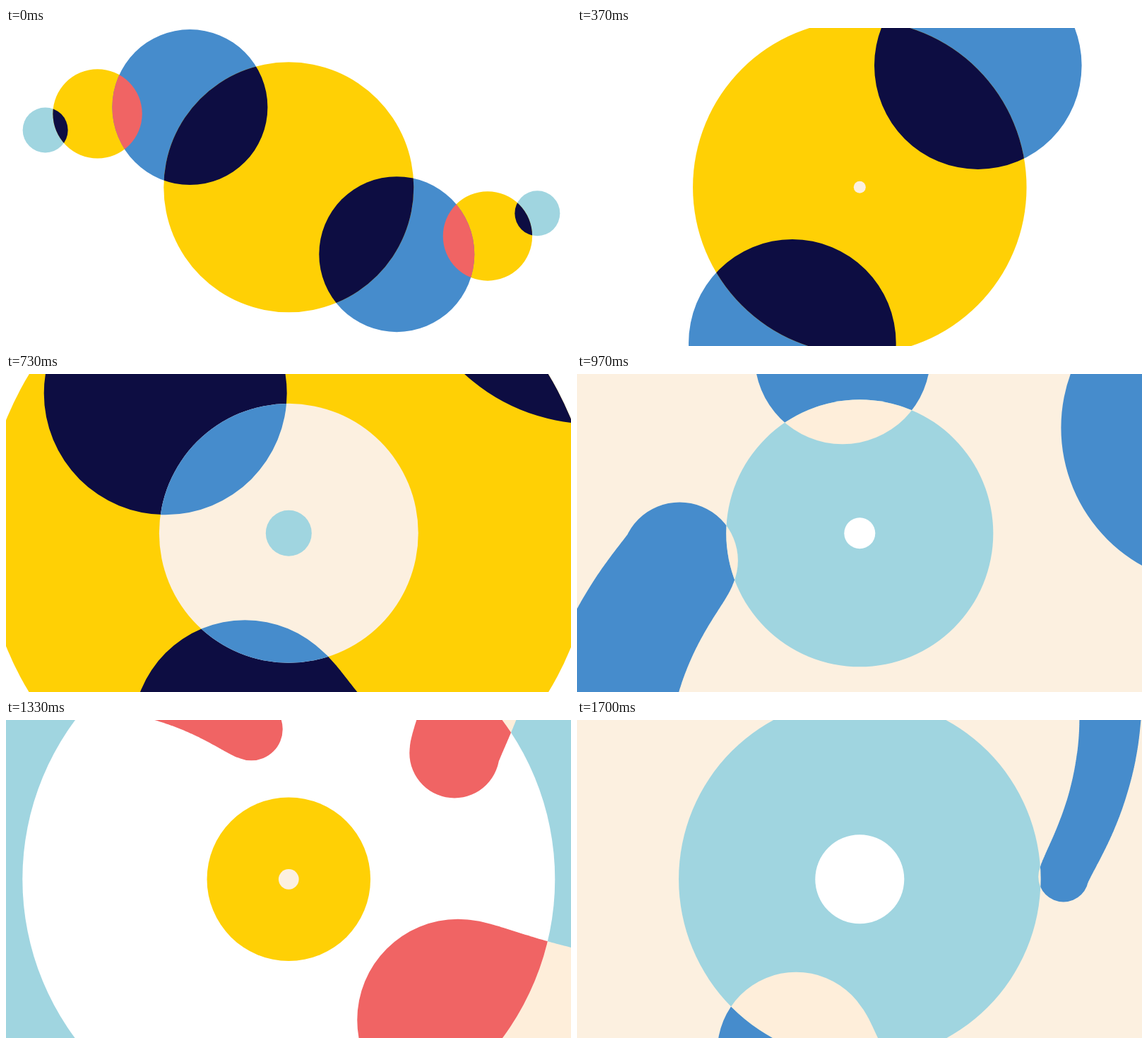
These frames come from a looping animation (800x450 px, 1.73 s). An HTML page with a canvas:

```html
<!DOCTYPE html>
<html lang="en">
<head>
<meta charset="utf-8">
<title>Orbiting discs</title>
<style>
html, body { margin: 0; width: 100%; height: 100%; overflow: hidden; background: #fff; }
canvas { display: block; width: 800px; height: 450px; }
</style>
</head>
<body>
<canvas id="stage" width="800" height="450"></canvas>
<script>
const ctx = document.getElementById('stage').getContext('2d');
const LOOP = 1730, STEP = 100 / 3, CX = 400.3, CY = 225.3, RAD = Math.PI / 180;
const WHITE = '#ffffff', YELLOW = '#ffd005', CREAM = '#fcf0e0', PEACH = '#feeeda',
      AQUA = '#a0d5e0', BLUE = '#468ccc', NAVY = '#0d0d42', RED = '#f06464';

// Disc colours in turn, each with the colour an orbiter takes on over it.
const CYCLE = [[CREAM, BLUE], [AQUA, PEACH], [WHITE, RED], [YELLOW, NAVY]];

// Discs opening from the centre: start step, and growth of the radius' cube root.
const DISCS = [[4.834, 0.331], [13.233, 0.364], [22.03, 0.402], [28.949, 0.441],
               [35.138, 0.5], [39.238, 0.54], [43.631, 0.54]];

const decay = (m, floor, span, k, p) => floor + span * Math.exp(-((Math.max(m, 0) / k) ** p));
const cubic = (m, a, b, c, d) => a + m * (b + m * (c + m * d));
const mix = (a, b, t) => a + (b - a) * t;
const zoom = n => 1 + 1.435 * (n / 22) ** 2.1;

function smooth(t) {
  t = Math.min(1, Math.max(0, t));
  return t * t * (3 - 2 * t);
}

// Spirals by m, the steps since SPIRAL; the first two set out from the opening chain.
const SPIRAL = 22;
const ORBITERS = [
  { from: 219, sweep: 95.2, tail: 16,
    angle: m => cubic(m, 462.4, 11.55, -0.29, 0.0068),
    dist: m => cubic(m, 288.7, -3, -0.2975, 0.01382),
    size: m => decay(m, 33, 126, 7.5, 1),
    turn: m => 22 + 0.12 * m,
    reach: m => 150 - 50 * (m / 29) ** 6 },
  { from: 31.8, sweep: 81.6, tail: 29,
    angle: m => cubic(m, 228.6, 5.1, 0, 0.0004),
    dist: m => cubic(m, 264, -2.33, -0.0147, 0.01332),
    size: m => decay(m, 46, 126, 11.5, 1.5),
    turn: m => 32 - 1.05 * m,
    reach: m => 150 },
  { tail: 36,
    angle: m => cubic(m, -44.5, 3.6, 0.06, 0),
    dist: m => decay(m, 257, 346, 13.57, 2.17),
    size: m => decay(m, 104, 164, 14.3, 1.6),
    turn: m => 1.2 * m - 14,
    reach: m => 155 }
];

function polar(angle, dist) {
  return [CX + dist * Math.cos(angle * RAD), CY + dist * Math.sin(angle * RAD)];
}

function circle(x, y, r) {
  const p = new Path2D();
  p.arc(x, y, r, 0, 2 * Math.PI);
  return p;
}

function fill(path, color) {
  ctx.fillStyle = color;
  ctx.fill(path);
}

function fillInside(clip, paths, color) {
  ctx.save();
  ctx.clip(clip);
  paths.forEach(p => fill(p, color));
  ctx.restore();
}

const spin = (o, n) => o.sweep * (n / 11) ** 1.6;

function pose(o, n) {
  const m = n - SPIRAL;
  const inner = [o.angle(m), o.dist(m), o.size(m)];
  if (!o.sweep) return inner;
  const outer = [o.from + spin(o, n), 180 * zoom(n), 110 * zoom(n)];
  const t = smooth((n - 11) / 11);
  return outer.map((v, i) => mix(v, inner[i], t));
}

// Head plus a tail that spirals outwards behind it.
function orbiterPath(o, n) {
  const [angle, dist, size] = pose(o, n), m = n - SPIRAL;
  const grown = smooth((n - o.tail) / 6), count = grown ? 120 : 0;
  const turn = o.turn(m) * grown, reach = o.reach(m) * grown;
  const path = new Path2D();
  for (let i = 0; i <= count; i++) {
    const s = 2.2 * i / 120;
    const [x, y] = polar(angle - turn * s ** 0.8, dist + reach * s);
    const r = size + reach * 0.06 * s;
    path.moveTo(x + r, y);
    path.arc(x, y, r, 0, 2 * Math.PI);
  }
  return path;
}

// The two outer circles that follow each blue one at the start.
function drawChain(o, blue, n) {
  const k = zoom(n), angle = o.from + spin(o, n);
  const yellow = circle(...polar(angle - 18, 290 * k), 63.2 * k);
  const aqua = circle(...polar(angle - 25.8, 354 * k), 32 * k);
  fill(aqua, AQUA);
  fill(yellow, YELLOW);
  fill(blue, BLUE);
  fillInside(yellow, [blue], RED);
  fillInside(yellow, [aqua], NAVY);
}

function drawDisc(r, color, paths, over) {
  const disc = circle(CX, CY, r);
  fill(disc, color);
  fillInside(disc, paths, over);
}

function draw(n) {
  const paths = ORBITERS.map(o => orbiterPath(o, n));
  ctx.fillStyle = WHITE;
  ctx.fillRect(0, 0, 800, 450);
  ORBITERS.forEach((o, i) => o.sweep && drawChain(o, paths[i], n));
  drawDisc(177 * zoom(n), YELLOW, paths, NAVY);
  DISCS.forEach(([start, rate], i) => {
    const [color, over] = CYCLE[i % CYCLE.length];
    if (n > start) drawDisc((rate * (n - start)) ** 3, color, paths, over);
  });
}

function tick() {
  const t = performance.now() % LOOP;
  draw(Math.min(51, Math.floor((t + 4) / STEP)));
  requestAnimationFrame(tick);
}
tick();
</script>
</body>
</html>
```
